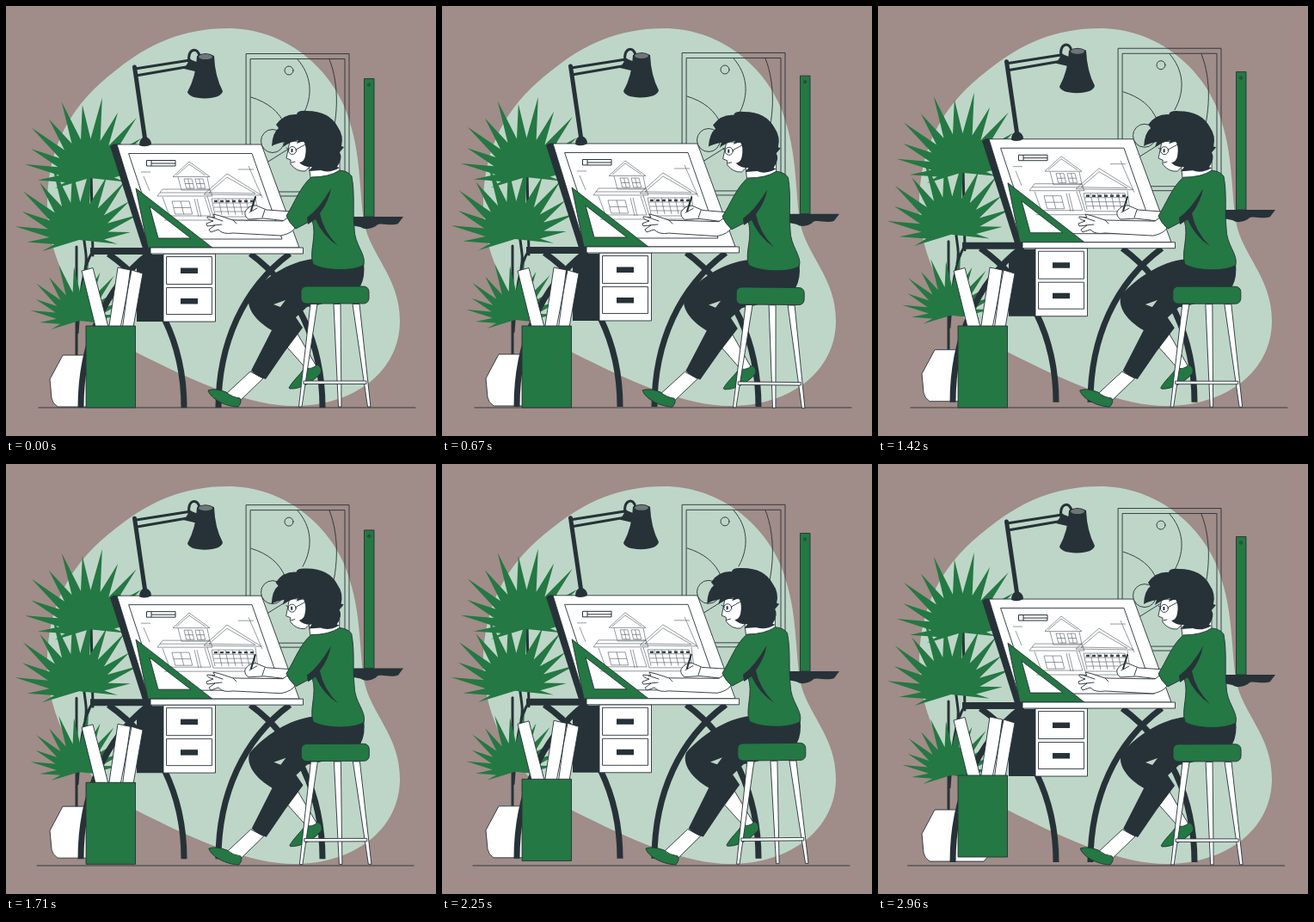
Write an HTML page that moves like this. It is 500 px wide and 500 px high and loops after 3 s.

```html
<!DOCTYPE html>
<html lang="en">
<head>
<meta charset="utf-8">
<title>Architect at the drawing desk</title>
<style>
  html, body { margin: 0; width: 100%; height: 100%; overflow: hidden; background: #a08c88; }
  svg { display: block; width: 100vw; height: 100vh; }
  .line { fill: none; stroke: #263238; stroke-width: .9; stroke-linejoin: round; stroke-linecap: round; }
  .sketch { fill: none; stroke: #4c565b; stroke-width: .6; }
  .white { fill: #fff; stroke: #263238; stroke-width: .9; stroke-linejoin: round; }
  .green { fill: #247843; stroke: #263238; stroke-width: .9; stroke-linejoin: round; }
  .leaf { fill: #247843; }
  .dark { fill: #263238; }
  .bar { fill: none; stroke: #263238; stroke-linecap: round; }
</style>
</head>
<body>
<svg viewBox="0 0 500 500">
  <path fill="#bed6c7" d="M258 26C320 26 371 66 393 116C413 165 410 205 416 250C423 290 458 315 458 366C458 425 405 465 335 465C285 465 225 440 150 402C90 370 48 300 48 232C48 150 88 105 130 73C165 45 205 26 258 26z"/>

  <g id="room">
    <g class="line">
      <path d="M279.500 55.500H399V221H279.500zM284.500 61.500H394V216H284.500z"/>
      <circle cx="329" cy="75" r="5"/>
      <circle cx="310" cy="157" r="13.500"/>
      <path d="M339 62C355 80 358 104 345 127M376 62C388 92 387 132 374 170M285 106C304 112 318 122 325 140M300 184L332 164"/>
    </g>

    <path class="bar" stroke-width="3" d="M99 195L101 290M90 265C92 285 95 292 92 306M82 280V410M101 285C88 305 86 340 83 380"/>
    <g id="palms" class="leaf"></g>
    <path class="white" d="M66 406H118L132 432L129 459L123 466H60Q54 462 53 456L51 434z"/>

    <g id="trestles" class="bar" stroke-width="7" style="stroke-linecap:butt"></g>
    <path class="dark" d="M98 281H170V289H98zM152 300L162 289H184V367H152z"/>
    <path class="white" d="M183 288H243.500V367H183z"/>
    <g id="drawers"></g>

    <path class="dark" d="M121 163L125 160.500H134L170 282H159z"/>
    <path class="white" d="M129 161H297L341 281H166z"/>
    <path class="line" d="M143 171.500H286L321 271H176z"/>

    <g class="sketch">
      <path stroke="#263238" stroke-width="1" d="M163.500 179.500H197V186H163.500zM169 179.500V186M169 183H197"/>
      <path d="M157 193H168M270 190H288M282 186L298 223M160 198L167 215"/>
      <path d="M194 198.500L213 181L237 198.500zM198 197L213 184L232 197M200 199L204 214H237L234 199"/>
      <path d="M182 213H237L240 221H176zM179 217H238M182 222L190 244H238L231 222M219 224L224 245M222 224L227 245"/>
      <path d="M230 219L257 195L297 220zM236 217L257 199L290 218zM234 221L241 245H293L290 221M184 249H292"/>
      <path id="panes"/>
    </g>
    <path stroke="#3b464b" stroke-width="2.400" stroke-dasharray="4 3" d="M242 227H288"/>

    <path class="green" fill-rule="evenodd" d="M151 212L240 281H165zM167 233L177 270H215z"/>
    <path class="white" d="M168 281H345.500V288H168z"/>

    <g class="bar">
      <path stroke-width="5" d="M149.500 71L162 157"/>
      <path stroke-width="3" d="M150 73L214 63M151 81L215 70M213 65C210 49 224 47 225 59"/>
    </g>
    <path class="dark" d="M155 162Q155 153 162 152Q169 154 169 161Q162 165 155 162zM207 73L214 62L224 66L220 76zM222 58Q232 52 242 58Q243 82 252 99Q250 107 231 107.500Q213 107 211 100Q221 82 222 58z"/>
    <ellipse cx="232" cy="59" rx="8" ry="3" fill="#6f7678"/>
  </g>

  <g id="ruler">
    <path class="green" d="M416.500 84.500H428V245H416.500z"/>
    <circle class="line" cx="422" cy="91.500" r="1.500"/>
    <path class="dark" d="M402 245H462L456 253C446 257 434 250 430 256Q420 262 412 257L402 255z"/>
  </g>

  <path id="floor" class="line" d="M38 467H476"/>

  <g id="box">
    <path class="white" d="M88 308L101 304.500L122 385H107zM130 304L144.500 307L134 385H118zM146 307L159 311L146 385H131z"/>
    <path class="green" d="M93 372H150.500V467H93z"/>
  </g>

  <g id="woman">
    <path class="white" d="M320 389L336 376L361 419L352 425z"/>
    <path class="green" d="M329 444C334 435 340 431 348 420Q354 424 362 417Q368 420 366 427C357 437 342 446 330 445z"/>
    <path class="white" d="M284 425L299 433L270 461L255 452z"/>
    <path class="green" d="M235 447Q243 444 256 449Q263 455 272 456Q275 460 270 466C256 466 238 457 235 447z"/>
    <path class="dark" fill-rule="evenodd" d="M358 294C328 297 300 317 283 336C278 350 290 366 309 377L285 424Q292 431 302 434L324 402L345 374L337 362L350 350Q380 346 412 326Q418 315 416 298zM311 347L325 342L319 350z"/>

    <g id="stool"></g>
    <path class="white" d="M346 436H419V439.500H346z"/>
    <rect class="green" x="343" y="326" width="79" height="20" rx="6"/>

    <path class="white" d="M331 239L303 237L291 232Q283 231 278 239Q277 245 282 248L300 247L326 250z"/>
    <path class="bar" stroke-width="2" d="M285 238L290 222"/>
    <path class="line" d="M283 240L292 235M301 237L298 246"/>
    <path class="white" d="M329 245L322 250L264 249L249 244L241 242L243 246L234 245Q233 248 241 250L233 253L234 256L243 255L236 260L238 263L247 260Q252 266 264 264L320 267Q333 264 336 258z"/>
    <path class="line" d="M240 246L252 250M242 255L251 254M264 249L268 253"/>

    <path class="white" d="M352 182L388 180V195Q370 205 354 200z"/>
    <path class="green" d="M355 199Q376 199 388 191Q398 192 402 198C406 220 403 239 405 258C405 278 419 288 416 301C404 309 369 308 357 300C352 286 362 268 356 249L337 259Q329 252 326 244C335 230 342 210 355 199z"/>
    <path class="dark" d="M350 246Q364 236 378 212Q375 228 365 241Q369 262 386 279Q368 267 360 248L351 254z"/>

    <path class="white" d="M330 157L326 177L331 179L331 184Q338 193 348 192L356 184V158z"/>
    <path class="dark" d="M309 163Q310 147 317 142L314 138Q323 125 338 126Q339 121 350 122Q376 122 386 141Q393 151 390 163L393 164L388 170Q392 177 385 187L388 188Q376 195 366 191L352 192L356 187Q347 188 341 182Q347 181 348 174Q350 164 346 157L338 160L340 156Q330 158 322 164L324 158Q314 160 309 163z"/>
    <g class="line">
      <circle cx="333" cy="168" r="4.500"/>
      <path d="M337 167L348 161M326 165L329 167M332 182L336 181"/>
    </g>
    <path class="dark" d="M331.500 166H333.500V170H331.500z"/>
  </g>
</svg>

<script>
const LOOP = 3000, TAU = Math.PI * 2;
const $ = id => document.getElementById(id);
const range = n => [...Array(n).keys()];

// Fan of spikes around a hub: short at both ends, longest in the middle.
function palm(x, y, short, long, spikes = 15) {
  const steps = 2 * spikes - 1;
  const points = range(steps).map(i => {
    const u = i / (steps - 1);
    const angle = (197 - 203 * u) * Math.PI / 180;
    const reach = short + (long - short) * Math.sqrt(Math.sin(Math.PI * u));
    const r = reach * (i % 2 ? .48 : i % 4 ? .9 : 1);
    return [x + r * Math.cos(angle), y - r * Math.sin(angle)].map(v => v.toFixed(1));
  });
  return `<path d="M${x} ${y}L${points.join('L')}z"/>`;
}

const trestleLeg = (top, foot) => {
  const lean = foot - top;
  return `<path d="M${top} 288C${top + lean * .65} 328 ${foot} 392 ${foot} 467"/>`;
};

const drawer = (y, h) =>
  `<path class="white" d="M186.500 ${y}h53v${h}h-53z"/><path class="dark" d="M203 ${y + h / 2 - 3}h20v6.500h-20z"/>`;

const stoolLeg = (top, foot) => `<path class="white" d="M${top} 346.500h8L${foot + 3.5} 466h-3.500z"/>`;

// Four-pane window, slanted with the drawing board.
const pane = (x, y, w, h) => {
  const slant = h * .25;
  return `M${x} ${y}h${w}l${slant} ${h}h${-w}zM${x + w / 2} ${y}l${slant} ${h}M${x + slant / 2} ${y + h / 2}h${w}`;
};

$('palms').innerHTML = palm(97, 200, 42, 95) + palm(85, 272, 45, 92) + palm(85, 366, 34, 70);
$('trestles').innerHTML = trestleLeg(166, 87) + trestleLeg(119, 207) + trestleLeg(330, 247) + trestleLeg(284, 368);
$('drawers').innerHTML = drawer(291.5, 32) + drawer(327.5, 31);
$('stool').innerHTML = stoolLeg(354, 340.5) + stoolLeg(381, 386.5) + stoolLeg(403, 420.5);
$('panes').setAttribute('d',
  pane(207, 201, 9, 11) + pane(220, 201, 9, 11) + pane(193, 227, 20, 15) +
  range(4).map(i => `M${239 + i * 1.3} ${224 + i * 5}h48`).join('') +
  range(7).map(i => `M${239 + i * 8} 224l4 19`).join(''));

const move = (id, x, y) => $(id).setAttribute('transform', `translate(${x.toFixed(2)} ${y.toFixed(2)})`);
const swell = (t, start, period) => (1 - Math.cos(TAU * (t - start) / period)) / 2;

function draw(t) {
  const late = Math.max(0, t / 1500 - 1);
  move('room', 0, .3 - 8.8 * swell(t, 210, 3640));
  move('ruler', 0, -8 * swell(t, 0, LOOP));
  move('box', 0, -10.2 * late * (1.2 - .2 * late));
  move('floor', late && (1.5 + 3.5 * late) * Math.sin(TAU * (t - 1500) / 260), 0);
  $('woman').setAttribute('transform', `rotate(${(.55 * Math.sin(TAU * t / LOOP)).toFixed(3)} 250 250)`);
}

function tick() {
  draw(performance.now() % LOOP);
  requestAnimationFrame(tick);
}
tick();
</script>
</body>
</html>
```
